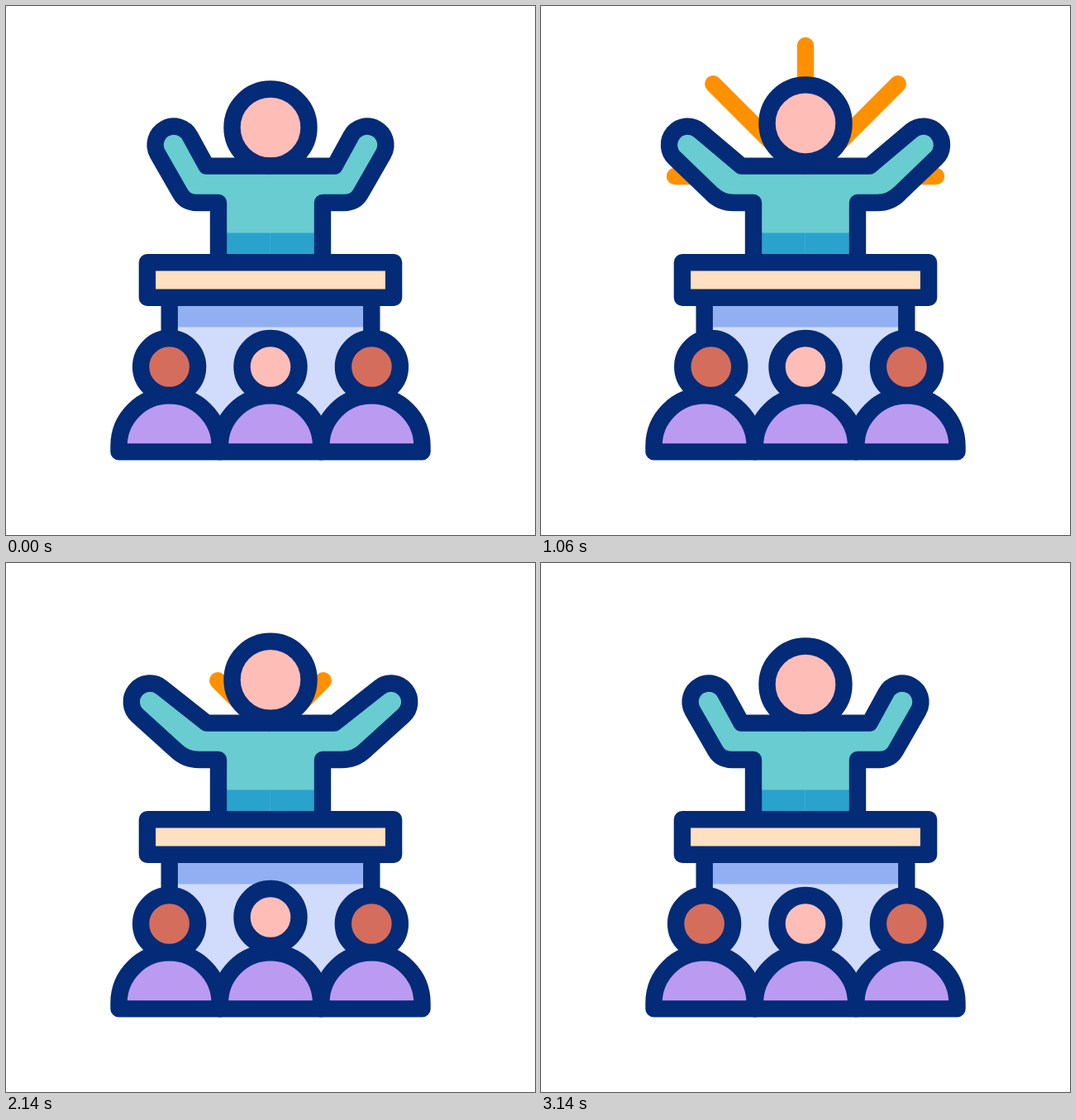
Write an HTML page with a canvas that moves like this. It is 640x640 px and loops after 3600 ms.

```html
<!DOCTYPE html>
<html lang="en">
<head>
<meta charset="utf-8">
<title>Speaker and audience</title>
<style>
html, body { margin: 0; width: 100%; height: 100%; overflow: hidden; background: #fff; }
canvas { display: block; width: 640px; height: 640px; }
</style>
</head>
<body>
<canvas id="stage" width="640" height="640"></canvas>
<script>
const ctx = document.getElementById('stage').getContext('2d');
const LOOP = 3600, LINE = 20.4;
const NAVY = '#042b77', SKIN = '#ffbdb8', BROWN = '#d56d5d', TEAL = '#68ccd1',
  BLUE = '#2aa2ce', PEACH = '#ffe0c0', SKY = '#92b0f1', PALE = '#d1dcfd',
  PURPLE = '#bb9af2', ORANGE = '#ff9100';

const ease = u => (1 - Math.cos(Math.PI * Math.min(1, Math.max(0, u)))) / 2;
const ramp = (t, from, to) => ease((t - from) / (to - from));

// Swing between 0 and 1 through turning points, starting from 0.
function swing(t, times) {
  for (let i = 1; i < times.length; i++) {
    if (t < times[i]) {
      const k = ramp(t, times[i - 1], times[i]);
      return i % 2 ? k : 1 - k;
    }
  }
  return 0;
}
const bump = (t, peak, half) => ease(1 - Math.abs(t - peak) / half);

function paint(path, fill) {
  if (fill) {
    ctx.fillStyle = fill;
    ctx.fill(path);
  }
  ctx.strokeStyle = NAVY;
  ctx.lineWidth = LINE;
  ctx.stroke(path);
}

function box(x, y, w, h, color) {
  ctx.fillStyle = color;
  ctx.fillRect(x, y, w, h);
}

function disc(x, y, r, fill) {
  const p = new Path2D();
  p.arc(x, y, r, 0, Math.PI * 2);
  paint(p, fill);
}

function rays(t) {
  const reach = 158;
  const tip = reach * ramp(t, 600, 864), tail = reach * ramp(t, 1124, 1457);
  if (tip - tail < 0.5) return;
  ctx.strokeStyle = ORANGE;
  ctx.lineWidth = LINE;
  ctx.beginPath();
  for (let i = 0; i < 5; i++) {
    const a = -Math.PI * i / 4, c = Math.cos(a), s = Math.sin(a);
    ctx.moveTo(320 + c * tail, 206 + s * tail);
    ctx.lineTo(320 + c * tip, 206 + s * tip);
  }
  ctx.stroke();
}

// Angle on a circle where the tangent from point (px, py) touches it.
function touch(cx, cy, r, px, py, side) {
  const dx = px - cx, dy = py - cy;
  return Math.atan2(dy, dx) + side * Math.acos(r / Math.hypot(dx, dy));
}

function halfTorso(open) {
  const hx = 203 - 34 * open, hy = 168, r = 22.4;
  const ex = 211 - 6 * open, ey = 227;
  const p = new Path2D();
  p.moveTo(320, 193.6);
  p.lineTo(242.5, 193.6);
  p.arc(hx, hy, r, touch(hx, hy, r, 242.5, 193.6, -1), touch(hx, hy, r, ex, ey, 1), true);
  p.lineTo(ex, ey);
  p.quadraticCurveTo(217.3, 238, 231 + 3 * open, 238);
  p.lineTo(257, 238);
  p.lineTo(257, 310);
  const body = new Path2D(p);
  body.lineTo(320.5, 310);
  body.lineTo(320.5, 193.6);
  ctx.fillStyle = TEAL;
  ctx.fill(body);
  box(257, 274.5, 63.5, 35, BLUE);
  paint(p);
}

function speaker(open) {
  disc(320, 147 - 6.8 * open, 46.5, SKIN);
  halfTorso(open);
  ctx.save();
  ctx.translate(640, 0);
  ctx.scale(-1, 1);
  halfTorso(open);
  ctx.restore();
}

function lectern() {
  box(197.7, 352, 244.6, 180, PALE);
  box(197.7, 352, 244.6, 36.5, SKY);
  const legs = new Path2D('M197.7 353V530M442.3 353V530');
  paint(legs);
  const top = new Path2D();
  top.rect(170.9, 310.2, 298.2, 42.5);
  paint(top, PEACH);
}

function listener(x, dx, dy, skin) {
  const p = new Path2D();
  p.moveTo(x - 61.1, 539.4);
  p.arc(x, 532.4, 61.1, Math.PI, 0);
  p.lineTo(x + 61.1, 539.4);
  p.closePath();
  paint(p, PURPLE);
  disc(x + dx, 436.5 + dy, 34.5, skin);
}

function draw(t) {
  box(0, 0, 640, 640, '#fff');
  ctx.lineCap = 'round';
  ctx.lineJoin = 'round';
  rays(t < 1800 ? t : t - 1397);
  speaker(swing(t, [0, 408, 810, 1185, 1590, 2030, 2465]));
  lectern();
  listener(197.6, 15.5 * bump(t, 800, 540), 0, BROWN);
  listener(442.4, -15.5 * bump(t, 1620, 545), 0, BROWN);
  listener(320, 0, -14 * bump(t, 2438, 650), SKIN);
}

const begin = performance.now();
function tick() {
  draw((performance.now() - begin) % LOOP);
  requestAnimationFrame(tick);
}
tick();
</script>
</body>
</html>
```
